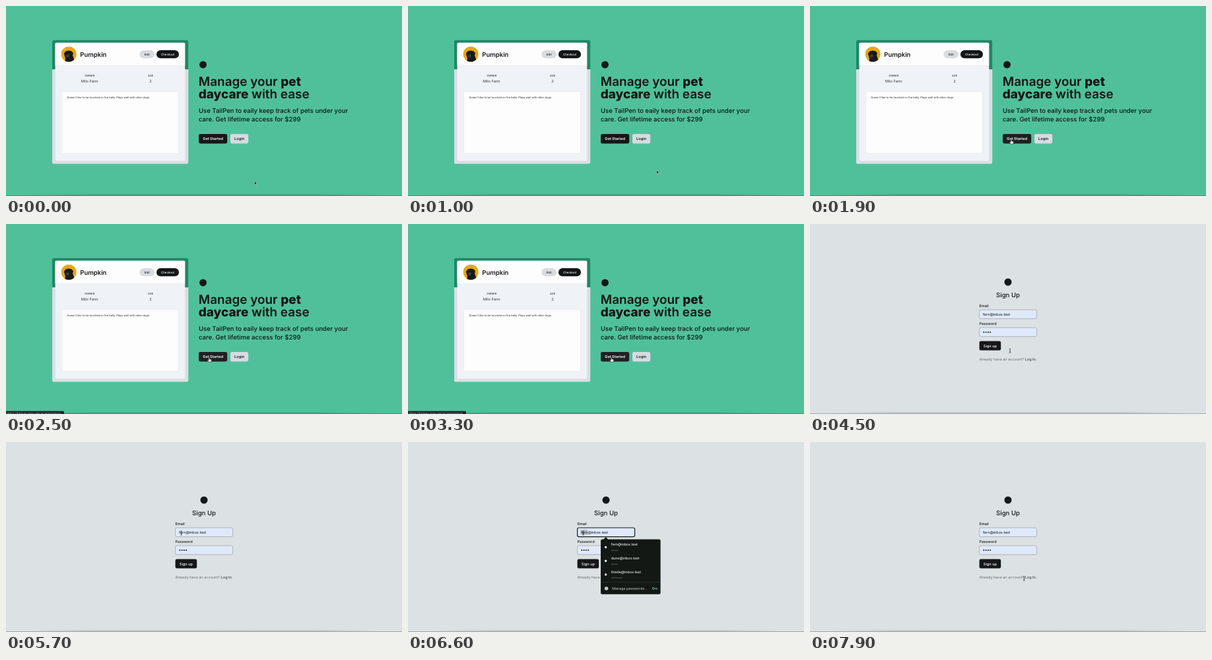
These frames come from a looping animation (600x288 px, 8000 ms). An HTML page:

```html
<!DOCTYPE html>
<html lang="en">
<head>
<meta charset="utf-8">
<title>Pet daycare sign up</title>
<style>
  html, body { margin: 0; width: 100%; height: 100%; overflow: hidden; background: #50c09b; }
  svg { display: block; width: 100vw; height: 100vh; }
  text { font-family: Inter, "Liberation Sans", sans-serif; text-rendering: geometricPrecision; white-space: pre; }
  .m { font-weight: 500; }
  .s { font-weight: 600; }
  .c { text-anchor: middle; }
  .field rect { fill: #dce1e4; stroke: #a1a7aa; stroke-width: .8; }
  .filled .field rect { fill: #dfe9fa; }
  .filled .focus rect { stroke: #161b1e; stroke-width: 1.2; }
</style>
</head>
<body>
<svg viewBox="0 0 600 288" preserveAspectRatio="none">
  <defs>
    <clipPath id="round"><circle cx="95.2" cy="73" r="11.5"/></clipPath>
    <clipPath id="frame"><rect x="70" y="51.700" width="206.200" height="187.600" rx="2.500"/></clipPath>
    <linearGradient id="edge">
      <stop offset="0" stop-opacity="0"/>
      <stop offset=".18" stop-opacity=".22"/>
      <stop offset=".82" stop-opacity=".22"/>
      <stop offset="1" stop-opacity="0"/>
    </linearGradient>
  </defs>

  <g id="home">
    <rect width="600" height="288" fill="#50c09b"/>
    <g clip-path="url(#frame)">
      <rect x="70" y="51" width="207" height="45" fill="#1d8865"/>
      <rect x="70" y="96" width="207" height="144" fill="#d9dfe3"/>
    </g>
    <rect x="74.600" y="55.700" width="196.600" height="179" rx="1.500" fill="#eff2f6"/>
    <path d="M74.600 90V57.200q0-1.500 1.500-1.500h193.600q1.500 0 1.500 1.500V90z" fill="#fdfdfd"/>
    <path d="M74.600 90h196.600" stroke="#e3e6ea" stroke-width=".5"/>
    <rect x="84.300" y="129.800" width="177.400" height="93.600" rx="1" fill="#fdfdfd" stroke="#e0e4e8" stroke-width=".6"/>
    <g clip-path="url(#round)">
      <rect x="83" y="61" width="25" height="25" fill="#e8a713"/>
      <path d="M88.500 86l1.500-6-1.200-4.500-1-3.500 2.700-3.600 4.500-.9 4.500 1 2.500 3-1 3.500 1.500 4 1.500 7z" fill="#17191c"/>
      <path d="M91 74.500q2.500-2.500 5 0l-.8 3.500h-3.400z" fill="#393b3f"/>
    </g>
    <text class="s" x="112.300" y="77.300" font-size="9.500" fill="#17191c">Pumpkin</text>
    <rect x="202.500" y="67" width="22.500" height="12.300" rx="6.150" fill="#d8dce1"/>
    <text class="m c" x="213.700" y="74.700" font-size="4.400" fill="#1b1f22">Edit</text>
    <rect x="228" y="67" width="34" height="12.300" rx="6.150" fill="#141516"/>
    <text class="m c" x="245" y="74.700" font-size="4.400" fill="#fff">Checkout</text>
    <g class="c" fill="#33383d">
      <text class="m" x="126.700" y="106.800" font-size="4">OWNER</text>
      <text class="m" x="219" y="106.800" font-size="4">AGE</text>
      <text x="126.700" y="115.700" font-size="5.700">Milo Fenn</text>
      <text x="219" y="115.700" font-size="5.700">2</text>
    </g>
    <text x="92.400" y="140.300" font-size="4.020" fill="#24282c">Doesn't like to be touched on the belly. Plays well with other dogs.</text>

    <circle cx="298.500" cy="88.900" r="5.500" fill="#141918"/>
    <g fill="#0e1512">
      <g class="s" font-size="18.900">
        <text x="291.800" y="121.200">Manage your <tspan font-weight="800">pet</tspan></text>
        <text x="291.800" y="140.100"><tspan font-weight="800">daycare</tspan> with ease</text>
      </g>
      <g class="m" font-size="9.550">
        <text x="292" y="162.200">Use TailPen to eaily keep track of pets under your</text>
        <text x="292" y="174.900">care. Get lifetime access for $299</text>
      </g>
    </g>
    <rect id="start" x="292" y="194" width="43.200" height="14.500" rx="2.400" fill="#151718"/>
    <text class="s c" x="313.600" y="203.200" font-size="5.600" fill="#fff">Get Started</text>
    <rect x="340" y="194" width="27.200" height="14.500" rx="2.400" fill="#d6dce1"/>
    <text class="s c" x="353.600" y="203.200" font-size="5.600" fill="#15191b">Login</text>
  </g>

  <g id="form">
    <rect width="600" height="288" fill="#dce1e4"/>
    <circle cx="300" cy="88" r="5.500" fill="#14181a"/>
    <text class="m c" x="300" y="110.900" font-size="9.600" fill="#14181a">Sign Up</text>
    <g class="m" font-size="5.600" fill="#171b1e">
      <text x="256.400" y="126">Email</text>
      <text x="256.400" y="153">Password</text>
    </g>
    <g class="field" id="email"><rect x="256.600" y="130" width="87" height="13.600" rx="2.400"/></g>
    <g class="field"><rect x="256.600" y="157" width="87" height="13.600" rx="2.400"/></g>
    <g id="values">
      <rect id="mark" x="261.600" y="133" width="10.800" height="7.600" fill="#b3bdc6"/>
      <text x="261.900" y="138.800" font-size="5.500" fill="#101417">fern@inbox.test</text>
      <g class="dots" data-dots="263.300 164 4 3.300 1" fill="#101417"></g>
    </g>
    <rect x="256.600" y="177.400" width="32.600" height="14.200" rx="2.400" fill="#151718"/>
    <text class="m c" x="272.900" y="186.500" font-size="5.600" fill="#fff">Sign up</text>
    <text x="256.400" y="207.200" font-size="5.550" fill="#6c7276">Already have an account? <tspan class="m" fill="#3f4549">Log In.</tspan></text>

    <g id="menu">
      <path d="M295.500 148.500l4.200-4.500 4.200 4.500z" fill="#131815"/>
      <rect x="292" y="147.600" width="90.600" height="83.200" rx="2.200" fill="#131815"/>
      <g id="rows"></g>
      <path d="M292 212.600h90.600" stroke="#343a37" stroke-width=".6"/>
      <circle cx="300.600" cy="222" r="2.700" fill="#c9cecb"/>
      <text x="309.300" y="223.900" font-size="5.300" fill="#cfd4d1">Manage passwords…</text>
      <g fill="none" stroke="#6fb9ab" stroke-width=".9">
        <circle cx="371.700" cy="222" r="1.500"/>
        <path d="M373.200 222h4.300v1.600M375.600 222v1.500"/>
      </g>
    </g>
  </g>

  <rect x="30" y="284.500" width="540" height="1.200" fill="url(#edge)" opacity=".25"/>
  <rect x="30" y="285.700" width="540" height="1.300" fill="url(#edge)" opacity=".6"/>
  <rect y="287" width="600" height="1" fill="#1c2a2c" opacity=".32"/>

  <g id="status">
    <path d="M0 288v-4.600h86.500q1.500 0 1.500 1.500v3.100z" fill="#20272a"/>
    <text x="1.200" y="289" font-size="4.700" fill="#b4bbb8">https://tailpen-bay.vercel.app/signup</text>
  </g>

  <g id="cursor">
    <path data-kind="arrow" d="M0 0v5.400l1.300-1.100.9 2 .9-.4-.9-1.900h1.700z" fill="#0c0e0f" stroke="#fff" stroke-width=".45"/>
    <path data-kind="hand" d="M-.7 .5q.7-.9 1.400 0v2.100l2.300.5q.7.300.6 1.100l-.6 2.600h-3.600l-2-2.400q-.1-.9.800-.7l1.100.8z" fill="#fff" stroke="#0c0e0f" stroke-width=".5"/>
    <path data-kind="beam" d="M-1.300-3.200q1.300 0 1.300.8q0-.8 1.300-.8M0-2.400v4.800M-1.300 3.200q1.300 0 1.300-.8q0 .8 1.300.8M-.8 .9h1.600" fill="none" stroke="#16191b" stroke-width=".65"/>
  </g>
</svg>
<script>
  const LOOP = 8000, STEP = 100;
  const $ = id => document.getElementById(id);

  // time, x, y of the pointer
  const path = [
    [0, 376.7, 265.6], [300, 401, 266.5], [400, 401, 266.5], [600, 398, 262],
    [700, 398, 262], [1600, 316, 212], [1900, 304.8, 202.2], [2200, 305.5, 202.4],
    [2600, 308.2, 202.2], [3300, 308.2, 202.2], [3400, 307.5, 202],
    [4400, 307.5, 202], [4700, 290, 164], [4900, 290, 164], [5400, 268, 141],
    [5700, 265.6, 138], [6900, 265.6, 138], [7100, 247, 147], [7300, 247, 149],
    [7800, 322, 205], [7900, 324.4, 207], [8000, 324.4, 207]
  ];
  const shapes = [[0, "arrow"], [1700, "hand"], [3400, "beam"], [7100, "arrow"], [7700, "beam"]];

  const ease = p => p * p * (3 - 2 * p);
  const ramp = (t, from, to) => Math.min(1, Math.max(0, (t - from) / (to - from)));
  const show = (el, on) => el.style.display = on ? "" : "none";

  function pointAt(t) {
    const i = Math.max(1, path.findIndex(k => k[0] >= t));
    const [t0, x0, y0] = path[i - 1], [t1, x1, y1] = path[i];
    const p = ease(ramp(t, t0, t1));
    return [x0 + (x1 - x0) * p, y0 + (y1 - y0) * p];
  }

  const dots = (x, y, n, gap, r) => Array.from({ length: n },
    (_, i) => `<circle cx="${x + i * gap}" cy="${y}" r="${r}"/>`).join("");

  document.querySelectorAll("[data-dots]").forEach(g =>
    g.innerHTML = dots(...g.dataset.dots.split(" ").map(Number)));

  $("rows").innerHTML = [["fern", 4], ["dune", 4], ["thistle", 7]].map(([user, n], i) => {
    const y = 157.2 + i * 20.7;
    return `<circle cx="299.6" cy="${y + 2.3}" r="1.7" fill="#eef1ef"/>
      <text class="m" x="307.8" y="${y}" font-size="5.25" fill="#eef1ef">${user}@inbox.test</text>
      <g fill="#b9c0bc">${dots(309.2, y + 7.2, n, 2.5, .6)}</g>`;
  }).join("");

  const pointers = [...$("cursor").children];

  function draw(t) {
    const signup = t >= 3400, filled = t >= 3700, focus = t >= 6000 && t < 7200;
    show($("home"), !signup);
    show($("form"), signup);
    show($("values"), filled);
    show($("menu"), focus);
    show($("mark"), focus && t >= 6200);
    $("form").classList.toggle("filled", filled);
    $("email").classList.toggle("focus", focus);
    $("start").setAttribute("fill", t >= 1700 ? "#1d2122" : "#151718");
    $("status").style.opacity = ramp(t, 2000, 2300) - ramp(t, 3700, 4100);

    const kind = shapes.filter(s => s[0] <= t).pop()[1];
    pointers.forEach(p => show(p, p.dataset.kind === kind));
    $("cursor").setAttribute("transform", `translate(${pointAt(t)})`);
  }

  const start = performance.now();
  function tick(now) {
    const t = Math.max(0, now - start) % LOOP;
    draw(Math.floor(t / STEP) * STEP);
    requestAnimationFrame(tick);
  }
  draw(0);
  requestAnimationFrame(tick);
</script>
</body>
</html>
```
